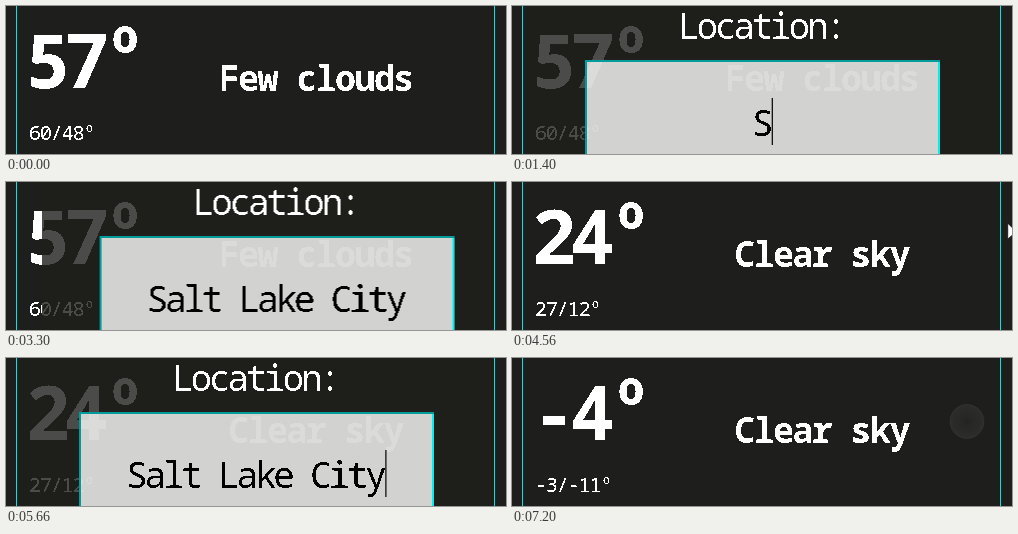
These frames come from a looping animation (500x148 px, 8.6 s). An HTML page:

```html
<!DOCTYPE html>
<html lang="en">
<head>
<meta charset="utf-8">
<title>Weather widget</title>
<style>
  html, body { margin: 0; width: 100%; height: 100%; overflow: hidden; background: #1e1e1c; }
  svg { display: block; width: 500px; height: 148px; }
  /* --pitch is the width of one character cell; glyphs stay centred in their cells. */
  text {
    font-family: "Noto Sans Mono", "DejaVu Sans Mono", monospace;
    font-weight: 500; font-stretch: 75%; fill: #fff; white-space: pre;
    letter-spacing: calc(var(--pitch) - 1ch);
    transform: translateX(calc((var(--pitch) - 1ch) / 2));
  }
  .temp { --pitch: 38.5px; font-size: 75.5px; font-weight: 600; }
  .range { --pitch: 10.9px; font-size: 20.5px; }
  .sky { --pitch: 19.4px; font-size: 35px; font-weight: 600; }
  .form { --pitch: 18.4px; font-size: 36px; }
</style>
</head>
<body>
<svg viewBox="0 0 500 148">
  <defs>
    <clipPath id="widget"><rect x="11" width="477" height="148"/></clipPath>
    <filter id="crisp" filterUnits="userSpaceOnUse" x="0" y="0" width="1000" height="148">
      <feComponentTransfer><feFuncA type="discrete" tableValues="0 1"/></feComponentTransfer>
    </filter>
    <radialGradient id="glow">
      <stop offset="0" stop-color="#333" stop-opacity=".2"/>
      <stop offset=".5" stop-color="#77777c" stop-opacity=".12"/>
      <stop offset="1" stop-color="#77777c" stop-opacity=".17"/>
    </radialGradient>
  </defs>
  <rect width="500" height="148" fill="#1e1e1c"/>
  <g filter="url(#crisp)">
    <text class="temp" x="23" y="82"><tspan id="temp"></tspan><tspan dy="-7">º</tspan></text>
    <text class="range" id="range" x="23.5" y="134"></text>
    <text class="sky" id="sky" y="85"></text>
  </g>
  <g clip-path="url(#widget)">
    <g id="overlay">
      <rect x="15" width="478" height="148" fill="#1e1e1c" fill-opacity=".8"/>
      <rect x="74" y="55" width="354" height="100" fill="#fff" fill-opacity=".8"/>
      <g fill="none" stroke-width="2">
        <path id="litEdge" d="M427 54V148"/>
        <path id="darkEdge" d="M74 148V55H428"/>
      </g>
      <g filter="url(#crisp)">
        <text class="form" x="167.7" y="33">Location:</text>
        <text class="form" id="city" y="130" style="fill:#000"></text>
      </g>
      <rect id="caret" y="92" width="1.2" height="47"/>
    </g>
  </g>
  <path d="M10.5 0V148M488.5 0V148" stroke="#00e6e6"/>
  <circle id="ripple" fill="url(#glow)" stroke="#8c8c90" stroke-opacity=".1"/>
  <path id="pointer" d="M0 0V16L4 12.5L6.5 18.5L9 17.5L6.5 11.8H12Z" fill="#fff" stroke="#111" stroke-width=".8"/>
</svg>
<script>
const LOOP = 8600, WIDTH = 478, CITY = "Salt Lake City", PITCH = 18.4, CENTER = 250.5;
const $ = id => document.getElementById(id);
const clamp = v => Math.min(1, Math.max(0, v));
const within = (t, from, to) => t >= from && t < to;
const show = (el, on) => el.setAttribute("visibility", on ? "inherit" : "hidden");
const setText = (id, value) => { if ($(id).textContent !== value) $(id).textContent = value; };

// The CSS "ease" curve: cubic-bezier(.25, .1, .25, 1)
function ease(x) {
  if (x <= 0 || x >= 1) return clamp(x);
  const bezier = (u, a, b) => 3 * u * (1 - u) ** 2 * a + 3 * u * u * (1 - u) * b + u ** 3;
  let lo = 0, hi = 1;
  for (let i = 0; i < 20; i++) {
    const mid = (lo + hi) / 2;
    if (bezier(mid, .25, .25) < x) lo = mid; else hi = mid;
  }
  return bezier(lo, .1, 1);
}

const weather = [
  { at: 0, temp: "57", range: "60/48º", sky: "Few clouds", x: 213.5 },
  { at: 3930, temp: "24", range: "27/12º", sky: "Clear sky", x: 223 },
  { at: 6360, temp: "-4", range: "-3/-11º", sky: "Clear sky", x: 223 }
];
const keyTimes = [1400, 1660, 1760, 1860, 1960, 2160, 2300, 2360, 2500, 2560, 2760, 2860, 3030, 3070];

// Each pointer path lists [time, x, y]; it is hidden outside its span.
const pointerPaths = [
  [[300, 468, 81], [330, 452, 74], [360, 438, 68], [730, 438, 68]],
  [[4560, 496, 41], [4730, 447, 63], [4800, 451, 58], [5160, 451, 58], [5310, 474, 26], [5430, 481, -20]],
  [[6360, 465, -8], [6500, 459, 51], [6730, 455, 63], [7000, 455, 63]]
];
const clicks = [
  { from: 5160, to: 5560, x: 451, y: 58 },
  { from: 7000, to: LOOP, x: 455, y: 63.5 }
];

function overlayShift(t) {
  const slideIn = start => WIDTH * (1 - ease((t - start) / 250));
  const slideOut = start => WIDTH * ease((t - start) / 200);
  if (t < 3280) return slideIn(750);
  if (t < 5160) return slideOut(3289);
  if (t < 7000) return slideIn(5186);
  return slideOut(7000);
}

function drawForm(t) {
  const shift = overlayShift(t);
  $("overlay").setAttribute("transform", `translate(${shift.toFixed(2)} 0)`);
  show($("overlay"), shift < WIDTH);
  const count = keyTimes.filter(k => k <= t).length, half = count * PITCH / 2;
  setText("city", CITY.slice(0, count));
  $("city").setAttribute("x", CENTER - half);
  $("caret").setAttribute("x", CENTER + half);
  const focused = t < 4500 || within(t, 5460, 6130);
  $("darkEdge").setAttribute("stroke", focused ? "#009c9c" : "#969698");
  $("litEdge").setAttribute("stroke", focused ? "#00f0f0" : "#e4e4e4");
  show($("caret"), within(t, 750, 1500) || within(t, 1660, 2560) ||
    within(t, 2760, 3300) || within(t, 5460, 5960));
}

function drawPointer(t) {
  const path = pointerPaths.find(p => within(t, p[0][0], p.at(-1)[0]));
  show($("pointer"), path);
  if (path) {
    const i = path.findIndex(p => p[0] > t), [t0, x0, y0] = path[i - 1], [t1, x1, y1] = path[i];
    const k = (t - t0) / (t1 - t0);
    $("pointer").setAttribute("transform", `translate(${x0 + (x1 - x0) * k} ${y0 + (y1 - y0) * k})`);
  }
  const click = clicks.find(c => within(t, c.from, c.to));
  show($("ripple"), click);
  if (click) {
    // The last click freezes partway through while the closing picture is held.
    const age = Math.min(t, 7200) - click.from;
    $("ripple").setAttribute("cx", click.x);
    $("ripple").setAttribute("cy", click.y);
    $("ripple").setAttribute("r", Math.max(0, 34 - age * .085));
  }
}

function render(t) {
  const now = weather.filter(w => w.at <= t).at(-1);
  for (const id of ["temp", "range", "sky"]) setText(id, now[id]);
  $("sky").setAttribute("x", now.x);
  drawForm(t);
  drawPointer(t);
}

const start = performance.now();
function tick() {
  render((performance.now() - start) % LOOP);
  requestAnimationFrame(tick);
}
tick();
</script>
</body>
</html>
```
